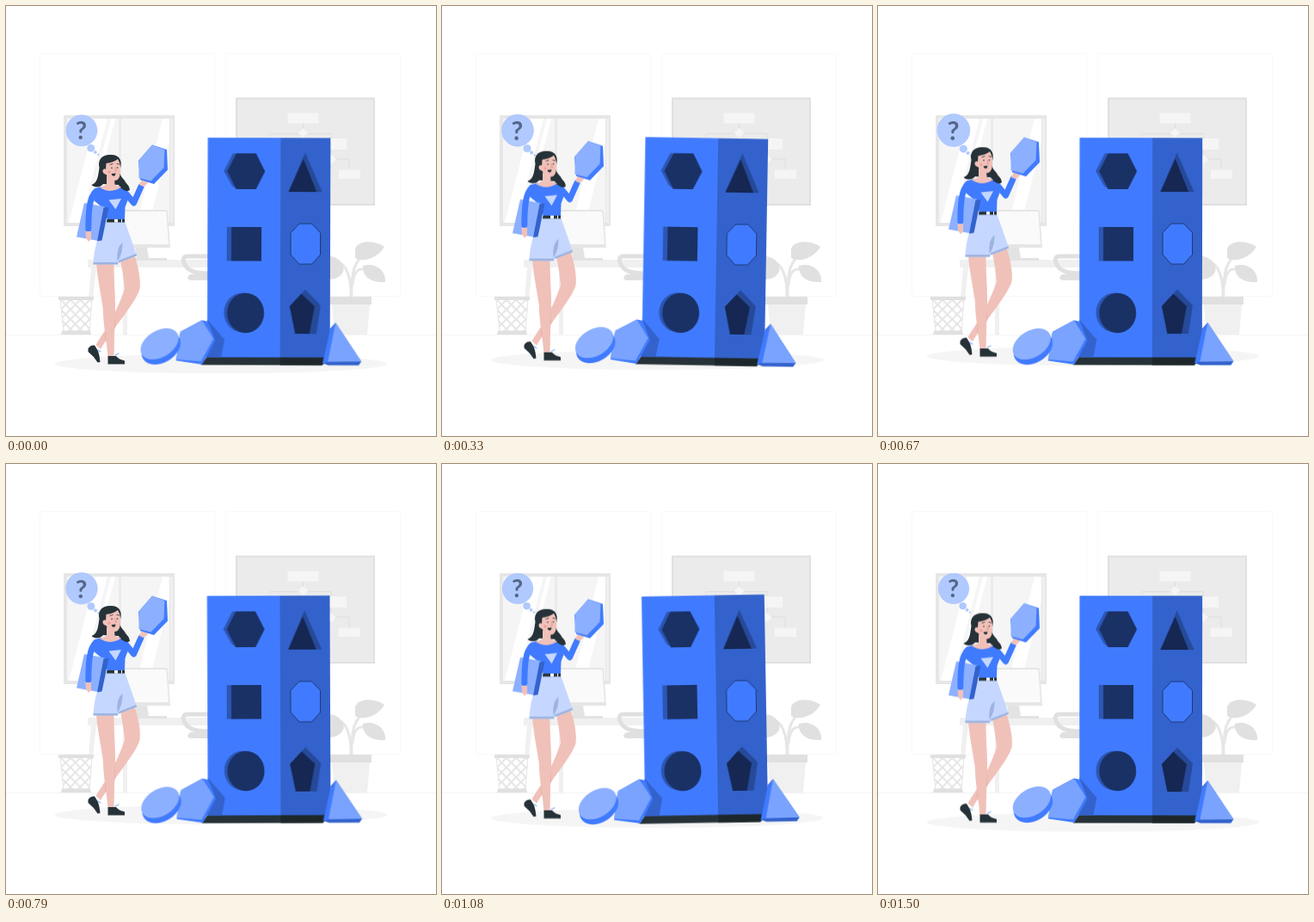
Recreate the animation shown at these times as an HTML page without scripts. Size 500 px wide and 500 px high, loop 1.54 s.

```html
<!DOCTYPE html>
<html lang="en">
<head>
<meta charset="utf-8">
<title>Shape sorter</title>
<style>
  html, body { margin: 0; height: 100%; overflow: hidden; background: #fff; }
  svg { display: block; width: 100%; height: 100%; }
  .tower, .float { animation: sway 1540ms linear -65ms infinite; }
  .tower { transform-origin: 285.5px 285.5px; }
  .float { animation-name: bob; }
  .bubble { transform-origin: 89px 150px; animation: pulse 1540ms linear infinite; }
  .bubble text { font: 700 29px Lato, sans-serif; text-anchor: middle; fill: #566689; }
  @keyframes sway { 25% { transform: rotate(1deg); } 75% { transform: rotate(-1deg); } }
  @keyframes bob {
    0%, 100% { transform: translateY(.8px); }
    50% { transform: translateY(-9.2px); }
  }
  @keyframes pulse {
    0% { transform: scale(1); }
    21% { transform: scale(1.025); }
    43% { transform: scale(1.055); }
    58%, 100% { transform: scale(.985); }
  }
  .blue { fill: #407bff; }
  .shade { fill: #3362cc; }
  .light { fill: #79a3ff; }
  .pale { fill: #8cb0ff; }
  .hole { fill: #1a3166; }
  .rim { fill: #2d56b3; }
  .hole-r { fill: #152752; }
  .rim-r { fill: #264a99; }
  .ink { fill: #263238; }
  .skin { fill: #f0c1b9; }
  .line { fill: none; stroke-linecap: round; stroke-linejoin: round; }
</style>
</head>
<body>
<svg viewBox="0 0 500 500" preserveAspectRatio="none">
  <defs>
    <pattern id="mesh" width="8" height="8" patternUnits="userSpaceOnUse" patternTransform="rotate(45 82 360)">
      <rect width="8" height="8" fill="#e6e6e6"/>
      <rect x="1" y="1" width="6" height="6" fill="#fff"/>
    </pattern>
  </defs>

  <!-- Room -->
  <g fill="none" stroke="#f8f8f8">
    <rect x="39.500" y="55.500" width="203" height="282" rx="2"/>
    <rect x="255.500" y="55.500" width="203" height="282" rx="2"/>
    <path d="M0 382.500H500" stroke="#f0f0f0" stroke-width=".7"/>
  </g>

  <!-- Window -->
  <path fill="#e6e6e6" d="M67 127H196V256H67z"/>
  <path fill="#f0f0f0" d="M191 131H194V252H191z"/>
  <path fill="#f5f5f5" d="M71 131H131V252H71zM134 131H190V252H134z"/>
  <path fill="#fff" d="M104 131H118L87 252H73zM122 131H127L96 252H91zM182 131H190V158L167 252H152z"/>
  <path fill="#ebebeb" d="M131 131H134V252H131z"/>

  <!-- Whiteboard -->
  <path fill="#ebebeb" stroke="#e0e0e0" stroke-width="2" d="M268 107.500H428V231H268z"/>
  <path fill="none" stroke="#dedede" d="M345.500 136V147M307 155V148.500H378V178H399V190"/>
  <path fill="#f5f5f5" d="M327.500 124.500h36v12h-36zM362 154h34v13h-34zM387 190.500h25v10.500h-25zM345.500 142l6 5.500-6 5.500-6-5.500zM378 173l6 5.500-6 5.500-6-5.500z"/>

  <!-- Desk and screen -->
  <path fill="#f0f0f0" d="M95 295H240V304H141V382H136V304H105L101 340H96L99 304H95z"/>
  <path fill="#e6e6e6" d="M132 237H186Q188 237 188 239L191 281H136z"/>
  <path fill="#fafafa" d="M134 239H185Q186.500 239 186.500 241L189 277H136z"/>
  <path fill="#e3e3e3" d="M150 281H164L166 293H187V296H140V293H152z"/>

  <!-- Chair -->
  <path fill="none" stroke="#e0e0e0" stroke-width="5" d="M238 291H211C202 291 207 304 216 308Q222 311 238 311"/>
  <path fill="#e0e0e0" d="M214 312H240V319H214Q208 317 214 312z"/>

  <!-- Bin -->
  <path fill="url(#mesh)" stroke="#e6e6e6" d="M63 341H100L97 379H67z"/>
  <path fill="#e0e0e0" d="M61 338H102V342H61zM65 377.500H98L99 382H64z"/>

  <!-- Plant -->
  <path fill="none" stroke="#e6e6e6" stroke-width="3" d="M402 340C401 312 404 295 420 287M403 325C404 308 410 303 422 307M401 340C402 315 395 296 382 298"/>
  <g fill="#e0e0e0">
    <path d="M406 282C410 272 429 272 440 280C433 292 417 299 406 293z"/>
    <path d="M415 302C428 298 442 306 441 321C428 322 414 317 415 302z"/>
    <path d="M374 291C386 290 395 301 392 309C388 317 380 318 374 318z"/>
    <path d="M376 338H425V347H376z"/>
  </g>
  <path fill="#f0f0f0" d="M379 347H423L420 382H382z"/>

  <ellipse class="float" cx="250" cy="416" rx="193.500" ry="11.300" fill="#f5f5f5"/>

  <g class="tower">
    <path class="ink" d="M234 408H377L368 417.500H227z"/>
    <path fill="#1d272b" d="M319 408H377L368 417.500H319z"/>
    <path class="blue" d="M234.300 153.300H319V408.500H234.300z"/>
    <path class="shade" d="M319 153.300H377V408.500H319z"/>

    <path class="rim" d="M263.500 171.500H290V213H268L262.500 209 253 192z"/>
    <path class="hole" d="M267.500 171.500H290.500L301 192.300 290.500 213H267.500L257 192.300z"/>
    <path class="rim" d="M256.700 257H263V296.500H256.700z"/>
    <path class="hole" d="M262 257H297V296.500H262z"/>
    <ellipse class="rim" cx="275" cy="356.500" rx="21.500" ry="23"/>
    <ellipse class="hole" cx="278.800" cy="357" rx="21.500" ry="23.300"/>

    <path class="rim-r" d="M347.500 170.500L367.500 216H328z"/>
    <path class="hole-r" d="M345.500 177.500L361 216H328.500z"/>
    <path class="blue" stroke="#1a3166" stroke-width=".9" d="M341 253H355.500L365.500 263.500V289L355.500 300H341L331 289V263.500z"/>
    <path class="rim-r" d="M348 329.500L366 348 361 381H337L330 349z"/>
    <path class="hole-r" d="M343.500 334.500L359 349 353 381H336.500L330 349z"/>

    <path class="shade" d="M234.500 365L254.500 388 250.500 408.500H232z"/>
    <path class="blue" d="M228 365.500L235 367 243.500 389 228.500 417 198 412.500 203 379z"/>
    <path class="light" d="M203 379L228 365.500 241.500 387 227 413.500 198 411z"/>

    <g transform="rotate(-31 180 396)">
      <ellipse class="blue" cx="179.500" cy="398" rx="24.500" ry="17"/>
      <ellipse class="pale" cx="180.500" cy="393" rx="24" ry="15.500"/>
    </g>

    <path class="shade" d="M377 375L383.500 368 413.500 413 410.500 417.500H375L368.500 415z"/>
    <path class="blue" d="M383.500 368L375 413.500 368.500 415.500 377 377z"/>
    <path class="light" d="M383.500 368L413.500 413 374.500 413.500z"/>
  </g>

  <g class="bubble" fill="#b0c9ff" stroke="#9bbaff" stroke-width=".5">
    <circle cx="88" cy="144.800" r="18"/>
    <circle cx="98.800" cy="165.300" r="4"/>
    <circle cx="103.800" cy="170" r="1.600"/>
    <circle cx="107.300" cy="172.800" r=".9"/>
    <text x="87.500" y="155.500" stroke="none">?</text>
  </g>

  <g class="float">
    <!-- Legs and shoes -->
    <path class="skin" d="M133 296L150 291C154 305 157 318 155.500 329C151 345 125 374 110 399L104.500 394C113 380 127 361 138 329C137 317 135 306 133 296z"/>
    <path fill="#c99a91" d="M126.500 359V375L116 390 115 379z"/>
    <path class="skin" d="M105 299H125.500C125.500 323 127.500 340 127 357C126 375 126 392 125.500 408H118.500C117 389 113 371 112.800 352C110 333 106 315 105 299z"/>
    <path class="ink" d="M95.500 398.500Q98 394 103 394.500L107 401Q109 407 109.500 414L106.500 414.500Q102 407 95.500 402z"/>
    <path class="ink" d="M118.500 407H128Q131 411 138 412.500V416.500H118.500z"/>
    <path class="line" stroke="#8cb0ff" stroke-width="1.200" d="M107 400L110 402M127 406L131 404"/>

    <!-- Shorts -->
    <path fill="#c5d7ff" d="M117 250H138C143 264 148 278 152 290.500L131 298.500 130 300.500H101.500C102 283 107 264 117 250z"/>
    <path fill="#9db3e0" d="M101.500 298H130V300.500H101.500zM131 296L151.500 288 152 290.500 131 298.500zM135.500 275Q128 281 129.500 297Q136 288 135.500 275z"/>

    <!-- Raised arm and top -->
    <path class="line" stroke="#407bff" stroke-width="7" d="M137 215L148.500 229 157 210"/>
    <path class="skin" d="M155 208L158 202 163 202 165 206 160 210z"/>
    <path class="blue" d="M104 212Q112 209 122 210Q134 208 140 213L143 222 138.500 234 138 249H118L113 235 102 226z"/>
    <path fill="#c5d7ff" d="M119.500 225.500L134 224 127.500 236.500z"/>
    <path class="ink" d="M117.500 248H138V251.500H117z"/>
    <path fill="#fff" d="M126 248h4v3.500h-4zM134 248h1v3.500h-1z"/>

    <!-- Book -->
    <path class="pale" d="M91 229L115 233.500 107 273 82 268.500z"/>
    <path class="shade" d="M113.500 234.500L119.500 234 111.500 272.500 106 273.500z"/>
    <path class="line" stroke="#407bff" stroke-width="7" d="M104.500 215.500C97 223 96 237 95.800 259"/>
    <path class="skin" d="M92.500 262H99V271L96 274 93 270z"/>

    <!-- Head -->
    <path class="ink" d="M108.500 188C106 177 114 172.500 121 173C130 172 135 178 133.500 186C131 197 134 198 138 203C140 208 143 207 144 214C140 217 134 213 131 208L113 207C109 212 102 211 99.500 208C107 205 107 197 108.500 188z"/>
    <path class="skin" d="M117 198L126 200 126.500 208 134 210.500Q122 219 109 211L117 208z"/>
    <path class="skin" d="M116.500 183Q125 182 130 178Q134 184 133 194Q132 203.500 125.500 203Q119 202.500 116.500 196Q112 195 112.500 191Q114 188 116 190z"/>
    <path class="line" stroke="#263238" stroke-width=".8" d="M121 184.500L124 183.500M129 183.500L131.500 184"/>
    <circle class="ink" cx="123" cy="188.300" r=".8"/>
    <circle class="ink" cx="129.500" cy="188" r=".8"/>
    <path class="line" stroke="#d88980" stroke-width=".7" d="M127 188L128.500 192H126.500"/>
    <path class="ink" d="M122.500 195L127.500 194.500Q127 198 125 197.800Q123 197.500 122.500 195z"/>
    <circle cx="120" cy="193" r="1.600" fill="#ef9d95"/>

    <!-- Held block -->
    <path class="blue" d="M170 161.500L187 167 188 190.500 172 207 156 202 154 180z"/>
    <path class="pale" d="M170 161.500L184.500 167 183.500 188 168.500 203.500 154.500 200 154.500 179z"/>
    <path class="skin" d="M156.500 204Q160 202.500 164 205L160 207.500z"/>
  </g>
</svg>
</body>
</html>
```
